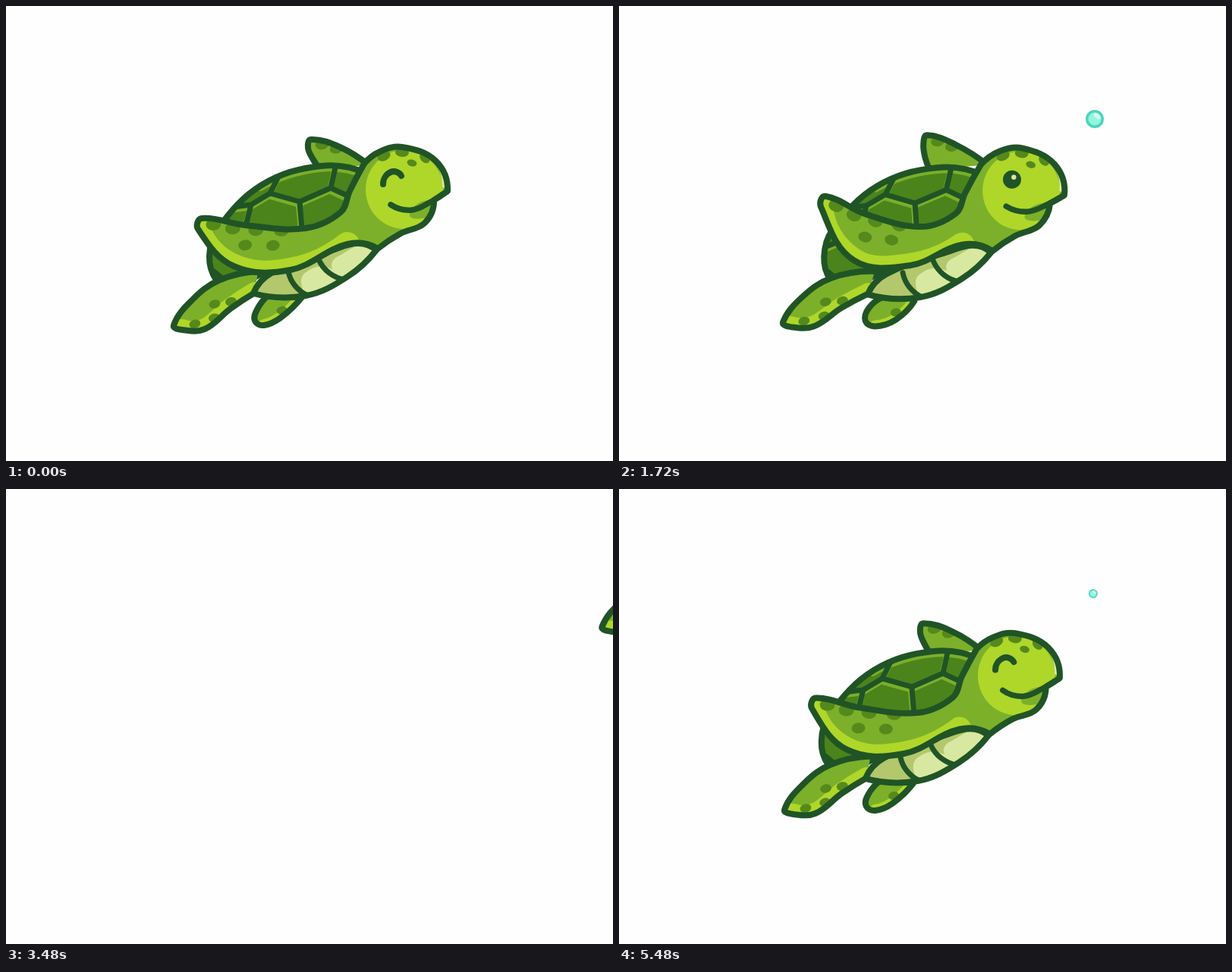
An HTML page with a canvas that plays this animation: 800x600 px, repeating every 5520 ms.

```html
<!DOCTYPE html>
<html lang="en">
<head>
<meta charset="utf-8">
<title>Swimming turtle</title>
<style>
html, body { margin: 0; width: 100%; height: 100%; overflow: hidden; background: #fefefe; }
canvas { display: block; width: 100vw; height: 100vh; }
</style>
</head>
<body>
<canvas id="stage" width="800" height="600"></canvas>
<script>
const ctx = document.getElementById('stage').getContext('2d');
const LOOP = 5520, STROKE = 1840, STEP = 40;
const INK = '#205426', SHELL = '#4b841b', RIM = '#7baf29', SKIN = '#7cb02a',
      LIME = '#afd729', SPOT = '#55891c', CREAM = '#d9e8a1', SAND = '#b3c86c';

const clamp = (v, lo, hi) => Math.min(hi, Math.max(lo, v));
const mix = (a, b, u) => a.map((v, i) => v + (b[i] - v) * u);

// Monotone cubic interpolation of rows [time, ...values]
function sample(rows, t) {
  let i = 0;
  while (i < rows.length - 2 && t >= rows[i + 1][0]) i++;
  const a = rows[i], b = rows[i + 1], h = b[0] - a[0];
  const u = clamp((t - a[0]) / h, 0, 1), u2 = u * u, u3 = u2 * u;
  const slope = (n, c) => (rows[n + 1][c] - rows[n][c]) / (rows[n + 1][0] - rows[n][0]);
  const tangent = (n, c) => {
    if (n === 0 || n === rows.length - 1) return 0;
    const p = slope(n - 1, c), q = slope(n, c);
    return p * q <= 0 ? 0 : 2 * p * q / (p + q);
  };
  return a.slice(1).map((v, j) => {
    const c = j + 1;
    return v * (2 * u3 - 3 * u2 + 1) + b[c] * (3 * u2 - 2 * u3)
      + h * (tangent(i, c) * (u3 - 2 * u2 + u) + tangent(i + 1, c) * (u3 - u2));
  });
}
const cyclic = rows => [-STROKE, 0, STROKE].flatMap(s => rows.map(([t, ...v]) => [t + s, ...v]));

// Travel: time, x, y
const LEAVE = [[1840, 0, 0], [2240, 56, -22], [2520, 153, -75], [2800, 258, -130],
  [3360, 525, -215], [3480, 570, -235], [3680, 602, -250]];
const ENTER = [[3680, -600, 188], [4320, -433, 173], [4440, -379, 169], [4880, -170, 118], [5520, 0, 0]];
// Body turn, body x, y, head turn, head x, y
const SWAY = cyclic([[0, 0, 0, 0, 0, 0, 0], [680, 12, 0, 0, 11, 7, 3], [760, 12, 0, 0, 13, 7, 9],
  [1080, 2, 2, 3, 5, 3, -4], [1720, 0.6, 3, 2, 3.5, 2, -2], [1800, 0.1, 0, 2, 1, 0, 1]]);
// Flipper pose: 0 highest ... 3 lowest
const FLAP = cyclic([[0, 1], [380, 2], [640, 2.9], [720, 3], [1080, 2], [1420, 0.9],
  [1600, 0.05], [1720, 0], [1800, 0.76]]);

// Flippers: upper edge from root to tip, then lower edge back, one row per pose
const ARM = [
  [441,271, 395,289, 322,273, 269,250, 263,264, 307,334, 382,340, 450,312],
  [441,272, 395,293, 315,289, 258,280, 253,294, 300,343, 375,348, 450,314],
  [441,270, 395,287, 323,302, 262,390, 267,404, 336,376, 401,330, 451,311],
  [442,269, 385,298, 333,341, 294,408, 302,420, 368,398, 413,344, 444,308]];
const withRaised = (u, poses) => [mix(poses[0], poses[1], u), ...poses];
const FAR_ARM = withRaised(-0.3, [
  [478,210, 440,186, 402,176, 398,187, 404,201, 413,214],
  [472,215, 440,204, 402,202, 400,210, 418,212, 436,215],
  [480,213, 468,209, 456,213, 456,219, 463,221, 470,222]]);
const LEG = withRaised(-0.3, [
  [332,350, 280,362, 245,388, 221,421, 232,427, 262,426, 296,399, 328,378],
  [322,355, 287,376, 262,404, 242,435, 256,441, 284,440, 311,405, 332,378],
  [325,350, 281,392, 286,440, 299,466, 306,464, 322,444, 326,413, 332,385]]);
const FAR_LEG = withRaised(0.8, [
  [345,382, 331,400, 328,415, 340,421, 362,411, 390,384],
  [345,383, 327,396, 322,413, 335,421, 364,412, 387,388],
  [356,398, 359,418, 370,432, 378,431, 387,411, 394,382]]);
// Spots: way from root to tip, way from upper to lower edge
const ARM_DOTS = [[.46, .08], [.6, .1], [.75, .15], [.9, .2]];
const ARM_INNER = [[.48, .45], [.635, .48]];
const LEG_DOTS = [[.467, .55], [.3, .8], [.77, .75], [.53, .9]];
const FAR_ARM_DOTS = [[.77, .15], [.5, .12]];
const FAR_LEG_DOTS = [[.35, .8]];

const SHELL_EDGE = [277,361, 268,330, 279,294, 337,236, 415,211, 476,221];
const SEAMS = [
  [361,221, 348,247, 387,258, 428,240, 434,213], [454,252, 428,240], [387,258, 390,294],
  [348,247, 323,262, 300,265], [323,262, 314,298, 272,316], [314,298, 340,324], [274,350, 299,371]];
const BUBBLES = [
  [[440, 613, 285, 0], [680, 613, 249, 12], [760, 610, 256, 12], [980, 612, 222, 0]],
  [[500, 640, 325, 0], [740, 634, 321, 17], [1080, 641, 246, 14], [1320, 642, 205, 0]],
  [[480, 628, 305, 0], [680, 626, 284, 18], [760, 625, 297, 22], [1080, 623, 225, 24],
   [1720, 627, 149, 12], [1800, 626, 137, 6], [1839, 625, 132, 0]],
  [[700, 648, 314, 0], [760, 650, 305, 6], [1080, 662, 208, 19], [1460, 662, 165, 0]],
  [[880, 645, 270, 0], [1080, 641, 216, 10], [1360, 640, 178, 0]],
  [[960, 647, 255, 0], [1080, 645, 232, 6], [1260, 645, 205, 0]]];

let pose, shift;

function turn(x, y, cx, cy, deg) {
  const a = deg * Math.PI / 180, c = Math.cos(a), s = Math.sin(a);
  return [cx + (x - cx) * c - (y - cy) * s, cy + (x - cx) * s + (y - cy) * c];
}
// Body turns about the shell; the head turns further, blended along the neck
function place(x, y) {
  const [rot, dx, dy, headRot, hx, hy] = pose;
  const u = clamp((x - 0.6 * (y - 240) - 470) / 60, 0, 1);
  const w = u * u * (3 - 2 * u);
  const b = turn(x, y, 387, 258, rot);
  const c = turn(525, 243, 387, 258, rot);
  const h = turn(b[0], b[1], c[0], c[1], headRot);
  return [b[0] + (h[0] + hx - b[0]) * w + dx + shift[0], b[1] + (h[1] + hy - b[1]) * w + dy + shift[1]];
}
const pairs = p => p.flatMap((v, i) => i % 2 ? [] : [[v, p[i + 1]]]);
const placed = p => pairs(p).map(q => place(...q));
function heading(a, b) {
  const dx = b[0] - a[0], dy = b[1] - a[1], d = Math.hypot(dx, dy) || 1;
  return [dx / d, dy / d];
}
// Smooth curve through the points; the ends continue as arcs
function smooth(p, { path = new Path2D(), join = false, closed = false } = {}) {
  const q = placed(p), n = q.length;
  const at = i => q[(i + n) % n];
  const dirs = q.map((_, i) => heading(at(i - 1), at(i + 1)));
  if (!closed) {
    const reflect = (c, d) => {
      const k = 2 * (c[0] * d[0] + c[1] * d[1]);
      return [k * c[0] - d[0], k * c[1] - d[1]];
    };
    dirs[0] = reflect(heading(q[0], q[1]), dirs[1]);
    dirs[n - 1] = reflect(heading(q[n - 2], q[n - 1]), dirs[n - 2]);
  }
  path[join ? 'lineTo' : 'moveTo'](...q[0]);
  for (let i = 0; i < (closed ? n : n - 1); i++) {
    const a = q[i], b = at(i + 1), da = dirs[i], db = dirs[(i + 1) % n];
    const h = Math.hypot(b[0] - a[0], b[1] - a[1]) * 0.36;
    path.bezierCurveTo(a[0] + da[0] * h, a[1] + da[1] * h, b[0] - db[0] * h, b[1] - db[1] * h, ...b);
  }
  return path;
}
function line(p) {
  const path = new Path2D();
  placed(p).forEach(q => path.lineTo(...q));
  return path;
}
function stroke(path, color, width) {
  ctx.strokeStyle = color;
  ctx.lineWidth = width;
  ctx.stroke(path);
}
function fill(path, color) {
  ctx.fillStyle = color;
  ctx.fill(path);
}
function oval(x, y, rx, ry, deg, color) {
  const p = new Path2D();
  p.ellipse(...place(x, y), rx, ry, (deg + pose[0]) * Math.PI / 180, 0, 7);
  fill(p, color);
}
function clipped(path, draw) {
  ctx.save();
  ctx.clip(path);
  draw();
  ctx.restore();
}
function morph(set, k) {
  const i = clamp(Math.floor(k), 0, 2);
  return mix(set[i], set[i + 1], k - i);
}
function spots(edge, dots, rx, ry, deg) {
  const q = pairs(edge), half = q.length / 2;
  const upper = q.slice(0, half), lower = q.slice(half).reverse();
  const along = (side, u) => {
    const i = Math.min(half - 2, Math.floor(u * (half - 1)));
    return mix(side[i], side[i + 1], u * (half - 1) - i);
  };
  dots.forEach(([u, v]) => oval(...mix(along(upper, u), along(lower, u), v), rx, ry, deg, SPOT));
}
const lowerEdge = edge => smooth(edge.slice(edge.length / 2));

function flipper(edge, dots, band, r) {
  const path = smooth(edge);
  fill(path, SKIN);
  clipped(path, () => {
    if (band) stroke(lowerEdge(edge), LIME, band);
    spots(edge, dots, r, r * 0.75, -15);
  });
  stroke(path, INK, 8);
}
function shell() {
  const path = smooth(SHELL_EDGE);
  placed([455,270, 440,300, 300,372]).forEach(q => path.lineTo(...q));
  path.closePath();
  const seams = SEAMS.map(line);
  fill(path, SHELL);
  clipped(path, () => {
    ctx.save();
    ctx.translate(-1.5, 4);
    stroke(smooth(SHELL_EDGE.slice(6)), RIM, 8);
    seams.forEach(s => stroke(s, RIM, 7));
    ctx.restore();
    seams.forEach(s => stroke(s, INK, 7));
  });
  stroke(path, INK, 8);
}
function belly() {
  const path = smooth([326,379, 395,382, 450,357, 488,322]);
  smooth([488,322, 464,313, 430,322, 350,352, 326,379], { path, join: true });
  fill(path, SAND);
  clipped(path, () => {
    fill(smooth([390,370, 393,353, 420,344, 446,364, 400,382], { closed: true }), CREAM);
    fill(smooth([430,346, 436,331, 486,318, 452,360], { closed: true }), CREAM);
    stroke(smooth([372,350, 381,369, 398,382]), INK, 7);
    stroke(smooth([412,334, 426,352, 447,361]), INK, 7);
  });
  stroke(path, INK, 8);
}
function face(open) {
  stroke(smooth([507,262, 535,269, 562,257, 581,245]), INK, 7.5);
  if (open) {
    oval(512, 228, 12, 12, 0, INK);
    oval(514, 225, 3.2, 3.2, 0, CREAM);
  } else {
    stroke(smooth([497,235, 507,219, 521,224]), INK, 8);
  }
}
function front(k, open) {
  const arm = morph(ARM, k);
  const path = smooth([472,208, 453,244, ...arm, 490,320]);
  smooth([490,320, 520,300, 552,286, 564,256], { path, join: true });
  smooth([582,244, 566,204, 522,186, 493,192, 472,208], { path, join: true });
  path.closePath();
  fill(path, SKIN);
  clipped(path, () => {
    stroke(lowerEdge(arm), LIME, 32);
    spots(arm, ARM_DOTS, 10, 8, -5 - (k - 1) * 22);
    spots(arm, ARM_INNER, 9, 7, -8 - (k - 1) * 18);
    oval(525, 242, 51, 52, 0, LIME);
    fill(smooth([532,274, 564,256, 558,277], { closed: true }), SKIN);
    oval(498, 198, 9, 6, -25, SPOT);
    oval(522, 193, 9, 6, 5, SPOT);
    oval(535, 207, 6.5, 4.5, 15, SPOT);
    oval(552, 200, 8, 6, 50, SPOT);
    stroke(smooth([562,201, 573,217, 577,238]), '#e2ecab', 3.5);
  });
  stroke(path, INK, 8);
  face(open);
}
function bubble(rows, t) {
  if (t < rows[0][0] || t > rows[rows.length - 1][0]) return;
  const [x, y, size] = sample(rows, t);
  if (size < 0.8) return;
  const cx = x + shift[0], cy = y + shift[1], w = Math.min(3.5, size * 0.3), r = size - w / 2;
  const g = ctx.createLinearGradient(cx - r, cy + r, cx + r, cy - r);
  g.addColorStop(0, '#8df6df');
  g.addColorStop(0.6, '#95f4e0');
  g.addColorStop(1, '#c3f7ec');
  const p = new Path2D();
  p.arc(cx, cy, r, 0, 7);
  fill(p, g);
  const shine = new Path2D();
  shine.ellipse(cx + r * 0.3, cy - r * 0.38, r * 0.5, r * 0.32, 0.7, 0, 7);
  fill(shine, 'rgba(225,252,246,.75)');
  stroke(p, '#4cd5bc', w);
}

function draw(t) {
  const beat = t % STROKE;
  shift = sample(t < 3680 ? LEAVE : ENTER, t);
  pose = sample(SWAY, beat);
  const k = sample(FLAP, beat)[0];
  ctx.fillStyle = '#fefefe';
  ctx.fillRect(0, 0, 800, 600);
  ctx.lineCap = ctx.lineJoin = 'round';
  flipper(morph(FAR_ARM, k), FAR_ARM_DOTS, 0, 9);
  flipper(morph(FAR_LEG, k), FAR_LEG_DOTS, 16, 7);
  shell();
  flipper(morph(LEG, k), LEG_DOTS, 28, 7.5);
  belly();
  front(k, t >= 560 && t < 2080);
  BUBBLES.forEach(b => bubble(b, beat));
}

const start = performance.now();
function tick() {
  const t = (performance.now() - start) % LOOP;
  draw(Math.floor(t / STEP) * STEP);
  requestAnimationFrame(tick);
}
tick();
</script>
</body>
</html>
```
